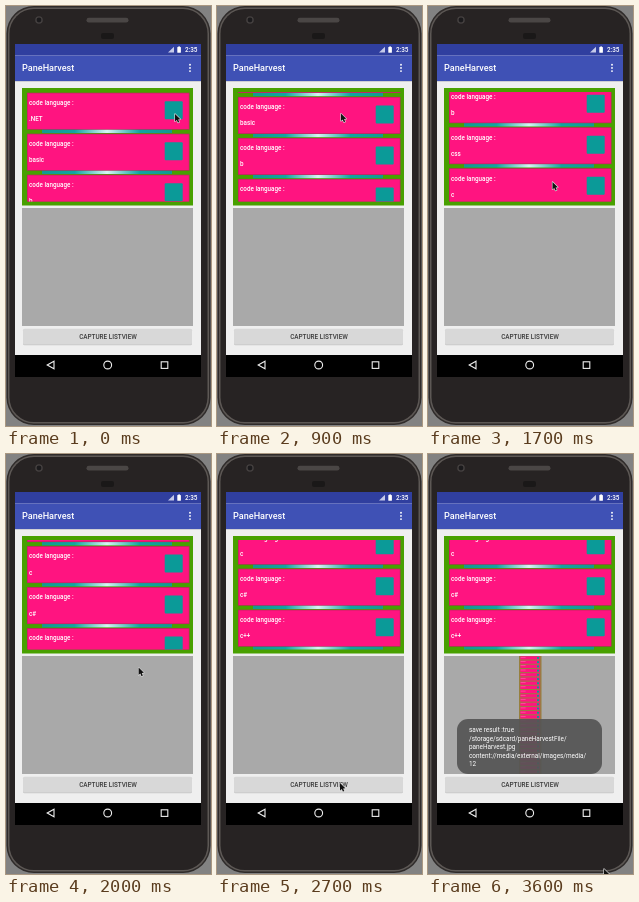
An HTML page with a canvas that plays this animation: 205x420 px, repeating every 3700 ms.

```html
<!DOCTYPE html>
<html lang="en">
<head>
<meta charset="utf-8">
<title>PaneHarvest</title>
<style>
html, body { margin: 0; width: 100%; height: 100%; overflow: hidden; background: #808080; }
canvas { display: block; width: 205px; height: 420px; }
</style>
</head>
<body>
<canvas id="stage"></canvas>
<script>
const W = 205, H = 420, LOOP = 3700, STEP = 100, PITCH = 41;
const PINK = '#ff1480', GREEN = '#48a000', TEAL = '#0b9a98';
const FONT = 'Roboto, "Noto Sans", sans-serif';
const languages = ['.NET', 'basic', 'b', 'css', 'c', 'c#', 'c++'];
const message = ['save result :true', '/storage/sdcard/paneHarvestFile/', 'paneHarvest.jpg',
  'content://media/external/images/media/', '12'];

// Pointer stops: time, x, y
const stops = [[0, 169, 108], [500, 130, 90], [1200, 120, 119], [1700, 124.5, 176],
  [2200, 137, 234], [2700, 123, 329], [3000, 123, 329], [3600, 176, 415]];

const canvas = document.getElementById('stage');
const g = canvas.getContext('2d');
const dpr = window.devicePixelRatio || 1;
canvas.width = W * dpr;
canvas.height = H * dpr;

const clamp = v => Math.max(0, Math.min(1, v));
const ease = p => p * p * (3 - 2 * p);
const mix = (a, b, p) => a + (b - a) * p;

// The list is pulled up and let back, then scrolled to its end.
function scrollAt(t) {
  if (t < 1200) return 52 * Math.sin(Math.PI * t / 1200);
  return 177 * ease(clamp((t - 1200) / 1000));
}

function pointerAt(t) {
  const next = Math.max(1, stops.findIndex(s => s[0] >= t));
  const [t0, x0, y0] = stops[next - 1], [t1, x1, y1] = stops[next];
  const p = ease((t - t0) / (t1 - t0));
  return [mix(x0, x1, p), mix(y0, y1, p)];
}

function rect(x, y, w, h, color) {
  g.fillStyle = color;
  g.fillRect(x, y, w, h);
}

function round(x, y, w, h, r, color) {
  g.fillStyle = color;
  g.beginPath();
  g.roundRect(x, y, w, h, r);
  g.fill();
}

function dot(x, y, r, color) {
  g.fillStyle = color;
  g.beginPath();
  g.arc(x, y, r, 0, 7);
  g.fill();
}

function path(points) {
  g.beginPath();
  points.forEach(([x, y]) => g.lineTo(x, y));
  g.closePath();
}

function text(s, x, y, size = 6.36, weight = 400, color = '#fff', align = 'left') {
  g.font = `${weight} ${size}px ${FONT}`;
  g.textAlign = align;
  g.fillStyle = color;
  g.fillText(s, x, y);
}

function clip(x, y, w, h, draw) {
  g.save();
  g.beginPath();
  g.rect(x, y, w, h);
  g.clip();
  draw();
  g.restore();
}

function drawPhone() {
  rect(0, 0, W, H, '#828282');
  ['#2f2b2a', '#5d5855', '#272323'].forEach((color, i) => {
    const inset = 0.5 + i * 1.5;
    round(inset, inset - 0.5, W - 2 * inset, H - 2 * inset, 28 - inset, color);
  });
  dot(33, 14, 3.8, '#454140');
  dot(33, 14, 2.4, '#1b1a1c');
  round(80.5, 11.8, 42, 4.8, 2.4, '#4a4645');
  round(95, 27, 13, 6, 2, '#1a1818');
}

function drawBars() {
  rect(9, 38, 186, 333, '#efefef');
  rect(9, 38, 186, 11.5, '#303f9f');
  rect(9, 49.5, 186, 25.5, '#3f51b5');
  rect(9, 75, 186, 1, '#cfcfd4');
  g.fillStyle = '#c5cae9';
  path([[162, 46.5], [168, 46.5], [168, 40.8]]);
  g.fill();
  round(171.3, 41, 3.6, 5.8, 0.5, '#fff');
  rect(172.4, 40.3, 1.4, 0.8, '#fff');
  text('2:35', 191.5, 46.3, 6.4, 500, '#fff', 'right');
  text('PaneHarvest', 16, 65.2, 9.1, 500);
  for (let i = -1; i < 2; i++) dot(184, 61.9 + i * 3.2, 0.95, '#fff');
}

function drawNav() {
  rect(9, 349, 186, 22, '#000');
  g.strokeStyle = '#eee';
  g.lineWidth = 1.1;
  path([[41.2, 359], [48, 355.2], [48, 362.8]]);
  g.stroke();
  g.beginPath();
  g.arc(101.7, 359, 3.9, 0, 7);
  g.stroke();
  g.strokeRect(155.2, 355.8, 6.6, 6.6);
}

function drawRow(name, y, band) {
  rect(36, y + 36, 130, 4, band);
  rect(21, y - 0.3, 162.5, 37, '#b8285c');
  rect(21.7, y + 0.4, 161.1, 35.6, PINK);
  text('code language :', 23, y + 12, 6.3, 500);
  text(name, 23, y + 28.2, 6.3, 500);
  round(158.7, y + 8.2, 18, 18, 1, TEAL);
}

function drawList(scroll) {
  const band = g.createLinearGradient(36, 0, 166, 0);
  ['#129a90', '#10a5a2', '#d5f6f4', '#10a5a2', '#129a90']
    .forEach((color, i) => band.addColorStop(i / 4, color));
  rect(16, 82, 171, 117.5, GREEN);
  clip(20, 86, 164, 109.5, () => {
    languages.forEach((name, i) => drawRow(name, 87 + i * PITCH - scroll, band));
  });
}

function drawCapture() {
  const rows = 28, pitch = 118 / rows;
  rect(91, 202, 22.5, 118, '#96803f');
  for (let i = 0; i < rows; i++) {
    const y = 202.3 + i * pitch;
    rect(92.3, y, 19.8, pitch - 1, PINK);
    rect(92.6, y + 0.8, 5, 0.5, '#ff78b3');
    rect(109, y + 0.7, 2.2, 1.9, TEAL);
  }
}

function drawToast(alpha) {
  g.save();
  g.globalAlpha = alpha;
  round(29, 265, 145, 55, 11, '#555');
  g.globalAlpha = clamp(alpha * 1.25);
  message.forEach((line, i) => text(line, 41, 278.3 + i * 8.5, 6.4, 400, '#fff'));
  g.restore();
}

function drawPointer([x, y]) {
  g.save();
  g.translate(x, y);
  g.scale(0.82, 0.82);
  g.lineJoin = 'round';
  g.lineWidth = 1.5;
  g.strokeStyle = '#ddd';
  g.fillStyle = '#111';
  path([[0, 0], [0, 9], [2.1, 7.2], [3.6, 10.5], [5.2, 9.8], [3.8, 6.6], [6.5, 6.4]]);
  g.stroke();
  g.fill();
  g.restore();
}

function render(t) {
  g.setTransform(dpr, 0, 0, dpr, 0, 0);
  drawPhone();
  drawBars();
  drawList(scrollAt(t));
  rect(16, 202, 171, 118, '#a9a9a9');
  if (t >= 2900) drawCapture();
  round(17, 323.2, 169, 16, 1.5, '#c6c6c6');
  round(17, 322.8, 169, 15.8, 1.5, '#d8d8d8');
  text('CAPTURE LISTVIEW', 102, 333, 6.36, 500, '#3a3a3a', 'center');
  drawNav();
  if (t >= 3000) drawToast(mix(0.7, 0.92, clamp((t - 3000) / 200)));
  drawPointer(pointerAt(t));
}

function tick() {
  const t = performance.now() % LOOP;
  render(Math.floor(t / STEP) * STEP);
  requestAnimationFrame(tick);
}
tick();
</script>
</body>
</html>
```
